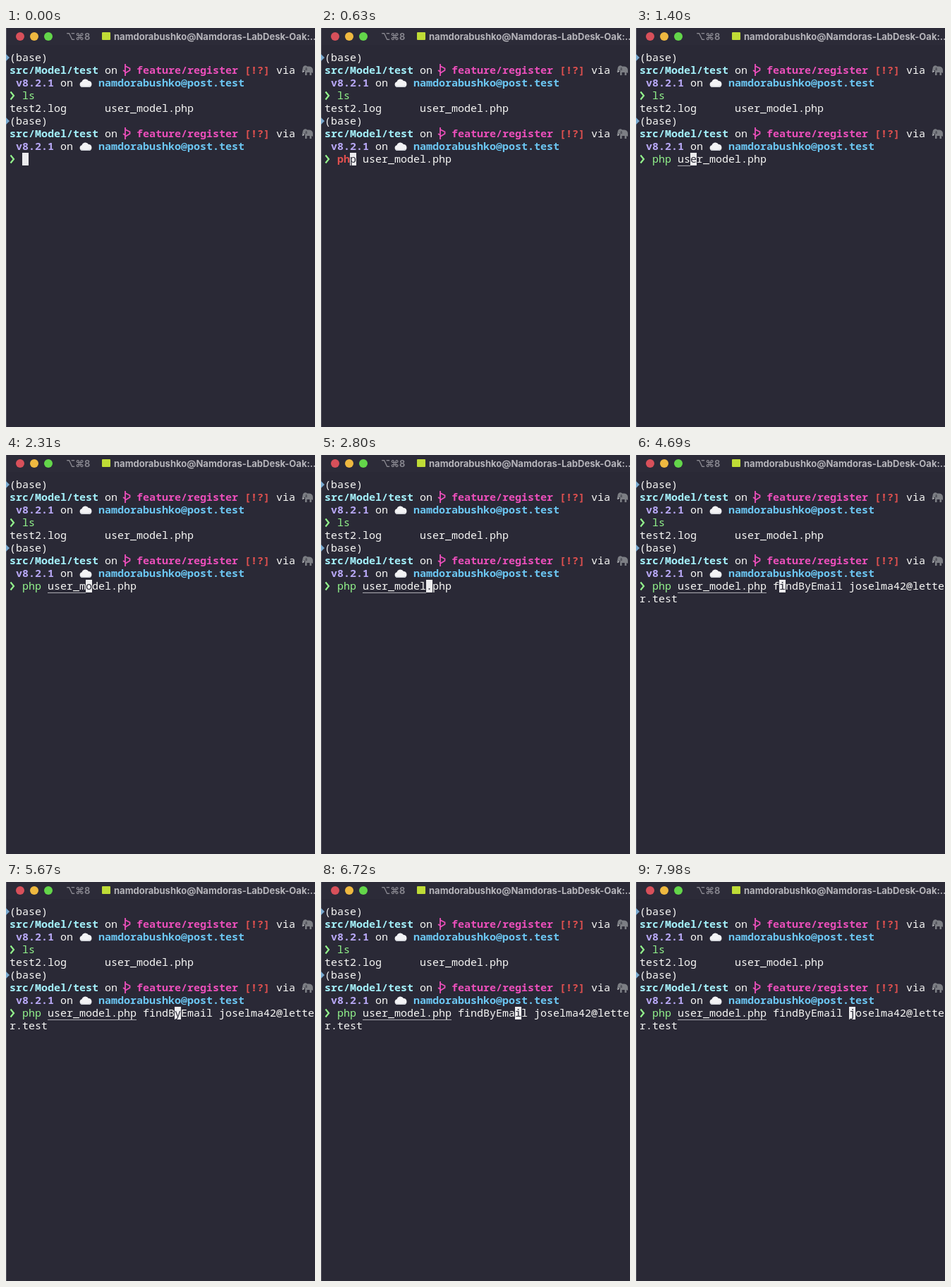
Write an HTML page that moves like this. It is 438 px wide and 566 px high and loops after 8000 ms.

```html
<!DOCTYPE html>
<html lang="en">
<head>
<meta charset="utf-8">
<title>Terminal</title>
<style>
  html, body { margin: 0; width: 100%; height: 100%; overflow: hidden; background: #2a2936; }
  svg { display: block; }
  text { white-space: pre; fill: #f8f8f6; font: 500 15px "Noto Sans Mono", "DejaVu Sans Mono", monospace; }
  .bold { font-weight: 700; }
  .path { fill: #a4f1fb; }
  .branch { fill: #ec4fbb; }
  .flag { fill: #e0504f; }
  .version { fill: #b8a8f6; }
  .account { fill: #6cc7f3; }
  .ok { fill: #93f58c; }
  .under { fill: #2a2936; }
  .title { fill: #b6b5bb; font: 700 13px Inter, "Open Sans", sans-serif; }
  .keys { fill: #8b8a92; font: 600 13px Inter, "DejaVu Sans", sans-serif; }
</style>
</head>
<body>
<svg width="438" height="566" viewBox="0 0 438 566">
  <defs>
    <path id="caret" d="M6.5 -10.5 11 -5 6.5 .5" fill="none" stroke="#93f58c" stroke-width="2.2"/>
    <path id="mark" d="M0 -10 5 -5 0 0z" fill="#78a9cf"/>
    <path id="fork" d="M169 -14V3M169 -1 175.5 -5V-8M169 -11 176 -7.500M166 -5 169 -3" fill="none" stroke="#ec4fbb" stroke-width="1.800"/>
    <g id="cloud">
      <path d="M108 1a4 4 0 0 1-.5-7.8A5.2 5.2 0 0 1 117-8a4.6 4.6 0 0 1 1.2 9z" fill="#f3f3f5"/>
      <path d="M105-1.5q8 2.5 16 0Q120 1 118 1H108Q106 1 105-1.5z" fill="#cfd2d8"/>
    </g>
    <g id="elephant">
      <path d="M435-5q0-5-5-5.500h-3q-2-2-4-1-2.500 1-2.500 4.500l-1 4 1.500 1 1.500-3h1.500V2h2.500v-4h4v4h2.500v-4l2 1z" fill="#7c7e84"/>
      <path d="M425-9.500q3 1 1.500 5l-2.500-1z" fill="#55565e"/>
      <path d="M420.500-2.500 423-4" stroke="#e6e6e6"/>
    </g>
  </defs>
  <rect width="438" height="566" fill="#2a2936"/>
  <rect width="438" height="24" fill="#2c2b38"/>
  <rect width="1" height="566" fill="#55545f"/>
  <circle cx="20" cy="12" r="6" fill="#d8505a"/>
  <circle cx="40" cy="12" r="6" fill="#efb940"/>
  <circle cx="60" cy="12" r="6" fill="#63d64a"/>
  <text class="keys" x="85" y="16.500">⌥⌘8</text>
  <rect x="136" y="6" width="12" height="11" rx="1" fill="#bfdc36"/>
  <text class="title" x="153" y="16.500">namdorabushko@Namdoras-LabDesk-Oak:...</text>
  <g id="screen"></g>
  <g id="command"></g>
</svg>
<script>
const CELL = 9, ROW = 18, LOOP = 8000;
const x = col => 5 + col * CELL;
const y = row => 47 + row * ROW;
const text = (row, col, str, cls = "") =>
  `<text x="${x(col)}" y="${y(row)}" class="${cls}">${str}</text>`;
const icon = (id, row) => `<use href="#${id}" y="${y(row)}"/>`;

const prompt = row => [
  icon("mark", row), text(row, 0, "(base)"),
  text(row + 1, 0, "src/Model/test", "bold path"), text(row + 1, 15, "on"),
  icon("fork", row + 1), text(row + 1, 20, "feature/register", "bold branch"),
  text(row + 1, 37, "[!?]", "bold flag"), text(row + 1, 42, "via"), icon("elephant", row + 1),
  text(row + 2, 1, "v8.2.1", "bold version"), text(row + 2, 8, "on"),
  icon("cloud", row + 2), text(row + 2, 14, "namdorabushko@post.test", "bold account"),
  icon("caret", row + 3)
].join("");

document.getElementById("screen").innerHTML = prompt(0) +
  text(3, 2, "ls", "ok") + text(4, 0, "test2.log") + text(4, 15, "user_model.php") + prompt(5);

const SCRIPT = "php user_model.php";
const FULL = SCRIPT + " findByEmail joselma42@letter.test";
const COLS = 48, START = 2, LINE = 8;
// Time of each keystroke, ms
const keys = [
  420, 560, 700, 910,
  1260, 1400, 1610, 1820, 2100, 2310, 2450, 2590, 2660, 2800, 3080, 3360, 3430, 3570, 3710,
  4340, 4760, 4900, 5040, 5670, 5880, 6300, 6440, 6720, 6860, 7000, 7210
];

function renderCommand(typed) {
  const shown = !typed ? "" : typed > SCRIPT.length ? FULL : SCRIPT;
  const split = COLS - START, cursor = START + typed;
  // The command word stays red until it is complete
  const word = typed < 3
    ? text(LINE, START, shown.slice(0, typed), "bold flag") + text(LINE, cursor, shown.slice(typed, 3))
    : text(LINE, START, "php", "ok");
  const rest = text(LINE, START + 4, shown.slice(4, split)) + text(LINE + 1, 0, shown.slice(split));
  const lineWidth = Math.max(0, Math.min(typed, SCRIPT.length) - 4) * CELL;
  return word + rest +
    `<rect x="${x(START + 4)}" y="195" width="${lineWidth}" height="1" fill="#acacb2"/>` +
    `<rect x="${x(cursor)}" y="177" width="9" height="18" fill="#ececee"/>` +
    text(LINE, cursor, shown[typed] || "", "under");
}

const command = document.getElementById("command");
let last = -1;
function draw() {
  const t = performance.now() % LOOP;
  const typed = keys.filter(k => k <= t).length;
  if (typed !== last) command.innerHTML = renderCommand(last = typed);
  requestAnimationFrame(draw);
}
draw();
</script>
</body>
</html>
```
